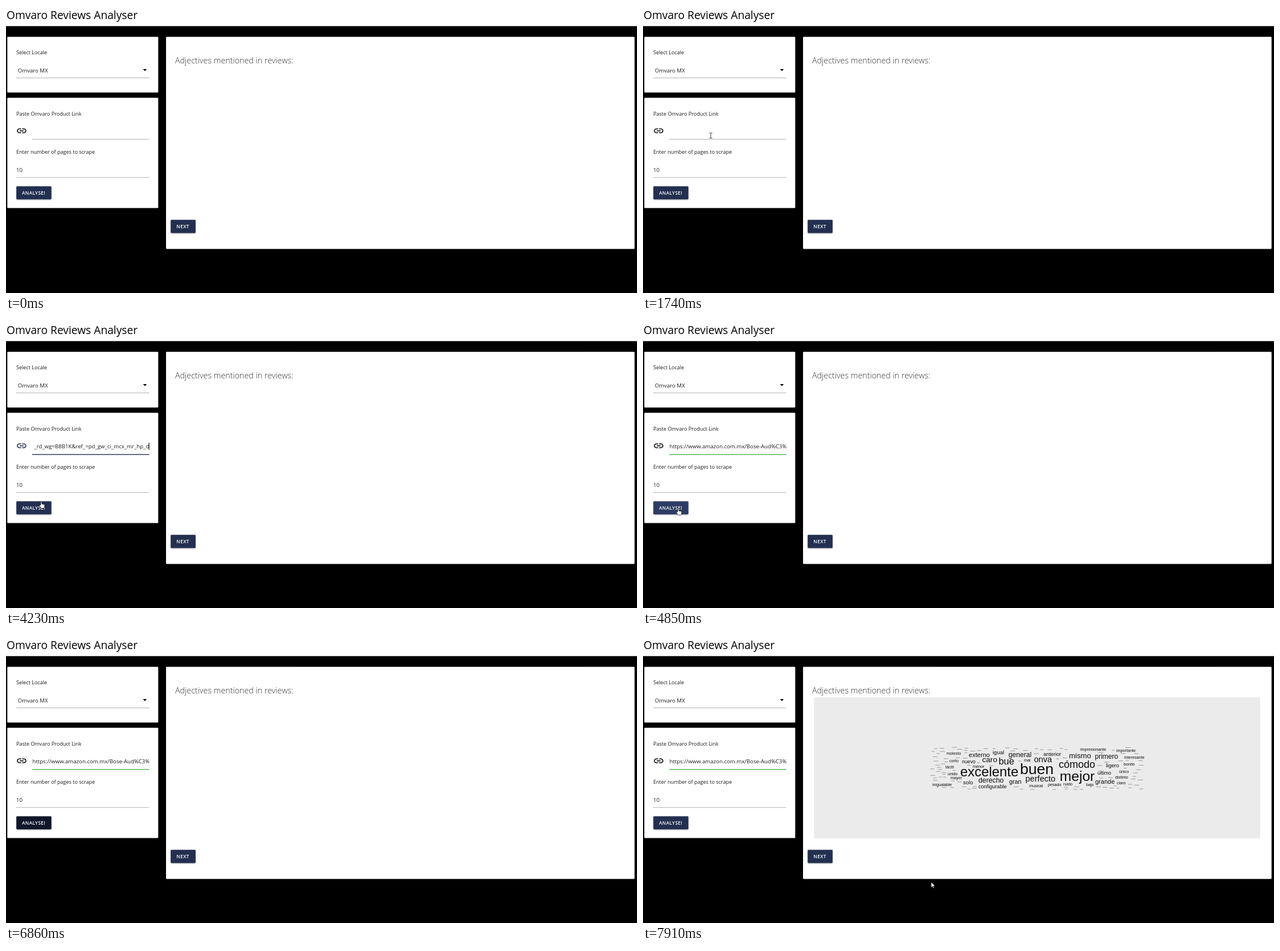
An HTML page that plays this animation: 1108x505 px, repeating every 8000 ms.

```html
<!DOCTYPE html>
<html lang="en">
<head>
<meta charset="utf-8">
<title>Reviews Analyser</title>
<style>
  html, body { margin: 0; width: 100%; height: 100%; overflow: hidden; background: #000; }
  #stage { display: block; width: 1108px; height: 505px; font-family: "Open Sans", "Noto Sans", sans-serif; }
  text { fill: #1c1c1c; white-space: pre; }
  .title { font-size: 19.2px; fill: #000; }
  .head { font-size: 14.3px; font-weight: 300; fill: #333; }
  .label { font-size: 9.05px; }
  .field { font-size: 9.65px; }
  .btn { filter: drop-shadow(0 1.2px 1px rgba(0, 0, 0, .3)); fill: #232f50; }
  .cap { font-size: 8.3px; font-weight: 600; letter-spacing: .35px; fill: #fff; }
  .line { fill: #9e9e9e; }
  #cloud text { font-family: "Liberation Sans", Arial, sans-serif; fill: #0c0c0c; }
</style>
</head>
<body>
<svg id="stage" viewBox="0 0 1108 505">
  <g fill="#fff">
    <rect width="1108" height="35.4"/>
    <rect x="2.3" y="54.2" width="265" height="98.1" rx="1.3"/>
    <rect x="2.3" y="161.5" width="265" height="194" rx="1.3"/>
    <rect x="281" y="54.2" width="822.7" height="373.2" rx="1.3"/>
  </g>
  <text class="title" x="1" y="22.5">Omvaro Reviews Analyser</text>
  <text class="label" x="18" y="85.3">Select Locale</text>
  <text class="field" x="20.7" y="116.8">Omvaro MX</text>
  <path d="M240.5 111h6.8l-3.4 3.5z"/>
  <rect class="line" x="18" y="126.2" width="233.5" height=".8"/>
  <text class="label" x="18" y="193.2">Paste Omvaro Product Link</text>
  <path id="icon" transform="translate(17.5 209.6) scale(.83)" d="M3.9 12c0-1.71 1.39-3.1 3.1-3.1h4V7H7c-2.76 0-5 2.24-5 5s2.24 5 5 5h4v-1.9H7c-1.71 0-3.1-1.39-3.1-3.1zM8 13h8v-2H8v2zm9-6h-4v1.9h4c1.71 0 3.1 1.39 3.1 3.1s-1.39 3.1-3.1 3.1h-4V17h4c2.76 0 5-2.24 5-5s-2.24-5-5-5z"/>
  <svg x="46" y="205" width="205.7" height="28" overflow="hidden">
    <text id="url" class="field" y="18.8"></text>
  </svg>
  <rect id="under" x="46" y="234.2" width="205.5"/>
  <rect id="caret" y="214" width="1" height="13"/>
  <text class="label" x="18" y="260.2">Enter number of pages to scrape</text>
  <text class="field" x="18" y="291.8">10</text>
  <rect class="line" x="18" y="301.4" width="233.5" height=".8"/>
  <rect id="go" class="btn" x="18.2" y="317.2" width="61.5" height="23" rx="1.4"/>
  <text class="cap" x="28" y="332.2">ANALYSE!</text>
  <text class="head" x="297" y="100.6">Adjectives mentioned in reviews:</text>
  <g id="cloud"><rect x="300.3" y="108" width="783.5" height="248" fill="#ebebeb"/></g>
  <rect class="btn" x="289.2" y="376.2" width="43.7" height="23.2" rx="1.4"/>
  <text class="cap" x="299.3" y="391.4">NEXT</text>
  <g id="mouse">
    <path id="arrow" d="M0 0v9.5l2.2-2 1.5 3.4 1.5-.7-1.5-3.2h3z" fill="#fff" stroke="#000" stroke-width=".6"/>
    <path id="beam" d="M-2.5-4.5h2l.5.5.5-.5h2M0-4v8M-2.5 4.5h2l.5-.5.5.5h2" fill="none" stroke="#222" stroke-width=".9"/>
    <path id="hand" d="M-1 5.8V.8a1 1 0 0 1 2 0V4l4 .8q1 .3 1 1.3l-.8 4.6q-.2.8-1 .8h-4q-.7 0-1-.6l-2.6-4.2q-.2-1 1-.8z" fill="#fff" stroke="#000" stroke-width=".7"/>
  </g>
</svg>
<script>
const LOOP = 8000;
const NAVY = [35, 47, 80], HOVER = [45, 60, 101], DARK = [17, 23, 42];
const GREY = [158, 158, 158], GREEN = [76, 175, 80], BLACK = [10, 10, 10];
const $ = id => document.getElementById(id);
const show = (el, on) => el.style.display = on ? "" : "none";

function add(tag, attrs, text = "") {
  const el = document.createElementNS("http://www.w3.org/2000/svg", tag);
  for (const k in attrs) el.setAttribute(k, attrs[k]);
  el.textContent = text;
  return $("cloud").appendChild(el);
}

// Word cloud: word, left, baseline, size
const SMALL = 7.2;
const words = [
  ["excelente", 557, 247, 23.9], ["buen", 662, 243, 26.6], ["mejor", 731.8, 255, 24.6],
  ["cómodo", 730, 232, 18], ["bue", 624.5, 225.7, 16.4], ["perfecto", 671.5, 256.3, 14.6],
  ["onva", 686.5, 221.6, 14.6], ["caro", 595.5, 221.6, 13.6], ["mismo", 748, 214.6, 13.2],
  ["derecho", 589, 258.3, 12.3], ["general", 641.8, 213.2, 12.1], ["primero", 793.5, 215.6, 12],
  ["externo", 572, 212.7, 11.1], ["grande", 794, 260.3, 11], ["gran", 643, 260, 10.8],
  ["igual", 614, 208.3, 9.5], ["solo", 562, 261, 9.5], ["ligero", 813, 231, 9.4],
  ["anterior", 703, 210.7, 9.2], ["configurable", 589, 268, 9.1], ["último", 798, 243.8, 9],
  ["nuevo", 560, 224, 8.8],
  ["molesto", 533, 209], ["corto", 538, 222], ["táctil", 531, 233], ["unido", 535, 245],
  ["mayor", 540, 252], ["menor", 579, 232], ["mal", 669, 221], ["inigualable", 508, 263.5],
  ["musical", 678, 266], ["pesado", 711, 264], ["ruido", 738, 263], ["bajo", 778, 264],
  ["claro", 832, 261], ["distinto", 829, 250.5], ["único", 836, 241], ["bonito", 844, 228.3],
  ["interesante", 845, 215.7], ["importante", 831, 203.5], ["impresionante", 768, 202]
];
const boxes = words.map(([word, x, y, size = SMALL]) => {
  const width = add("text", { x, y, "font-size": size }, word).getComputedTextLength();
  return [x, y - size * .72, x + width, y + size * .18];
});

// Rare words shrink to short dashes that fill the gaps
let seed = 11;
const random = () => (seed = (seed * 16807) % 2147483647) / 2147483647;
for (let i = 0, count = 0; i < 1800 && count < 95; i++) {
  const w = 5 + random() * 4, x = 504 + random() * (376 - w), y = 196 + random() * 74;
  if (boxes.some(b => x < b[2] + 2 && x + w > b[0] - 2 && y < b[3] + 1.5 && y > b[1] - 1.5)) continue;
  boxes.push([x, y - 1.5, x + w, y + 1.5]);
  add("path", { d: `M${x} ${y}h${w}`, stroke: "#858585", "stroke-width": .8 });
  count++;
}

// Pointer strokes: start, end, number of steps, way points
const strokes = [
  [270, 420, 3, [[779, 456], [640, 390], [486, 346]]],
  [740, 1510, 11, [[478, 341], [340, 240], [200, 158], [142, 196], [128, 244]]],
  [1590, 1740, 3, [[127, 240], [119, 228]]],
  [3480, 4170, 10, [[117, 234], [85, 280], [63, 312]]],
  [4230, 4390, 3, [[62, 318], [62, 330]]],
  [5940, 6240, 5, [[130, 352], [400, 430], [633, 468]]],
  [6470, 6780, 5, [[680, 469], [810, 478], [947, 498]]],
  [7760, 7910, 3, [[622, 448], [506, 433]]]
];

function pointer(t) {
  if (t < 270 || (t >= 6860 && t < 7760)) return null;
  const [start, end, n, pts] = strokes.filter(s => s[0] <= t).pop();
  const step = Math.floor((t - start) / (end - start) * (n - 1) + .01);
  const u = Math.min(1, step / (n - 1)) * (pts.length - 1);
  const i = Math.min(Math.floor(u), pts.length - 2);
  return pts[i].map((v, k) => v + (pts[i + 1][k] - v) * (u - i));
}

const ramp = (t, a, b) => Math.min(1, Math.max(0, (t - a) / (b - a)));
const mix = (a, b, u) => `rgb(${a.map((v, k) => Math.round(v + (b[k] - v) * u))})`;
const within = (t, a, b) => t >= a && t < b;

function draw(t) {
  const focus = ramp(t, 1900, 2300), blur = ramp(t, 4470, 4850), blurred = t >= 4540;
  const pasted = t >= 2850;

  $("icon").style.fill = blurred ? mix(NAVY, BLACK, blur) : mix(BLACK, NAVY, focus);
  $("under").style.fill = blurred ? mix(NAVY, GREEN, blur) : mix(GREY, NAVY, focus);
  $("under").setAttribute("height", .8 + .6 * focus);

  const url = $("url");
  url.textContent = !pasted ? "" : blurred
    ? "https://www.amazon.com.mx/Bose-Aud%C3%"
    : "_rd_wg=B8B1K&ref_=pd_gw_ci_mcx_mr_hp_d";
  url.setAttribute("x", blurred ? .5 : 205.3);
  url.setAttribute("text-anchor", blurred ? "start" : "end");
  $("caret").setAttribute("x", pasted ? 250.6 : 46);
  show($("caret"), within(t, 1970, 2530) || within(t, 2850, 3400) || within(t, 3930, 4460));

  $("go").style.fill = t >= 7470 ? mix(NAVY, NAVY, 0)
    : t >= 5940 ? mix(HOVER, DARK, ramp(t, 5870, 6240))
    : mix(NAVY, HOVER, ramp(t, 4200, 4540));
  show($("cloud"), t >= 7470);

  const p = pointer(t);
  show($("mouse"), p);
  if (!p) return;
  const [x, y] = p;
  const inField = within(x, 46, 252) && within(y, 205, 250);
  const onButton = within(x, 18, 80) && within(y, 317, 341);
  $("mouse").setAttribute("transform", `translate(${x} ${y})`);
  show($("beam"), inField);
  show($("hand"), onButton);
  show($("arrow"), !inField && !onButton);
}

const begin = performance.now();
function tick() {
  draw((performance.now() - begin) % LOOP);
  requestAnimationFrame(tick);
}
tick();
</script>
</body>
</html>
```
